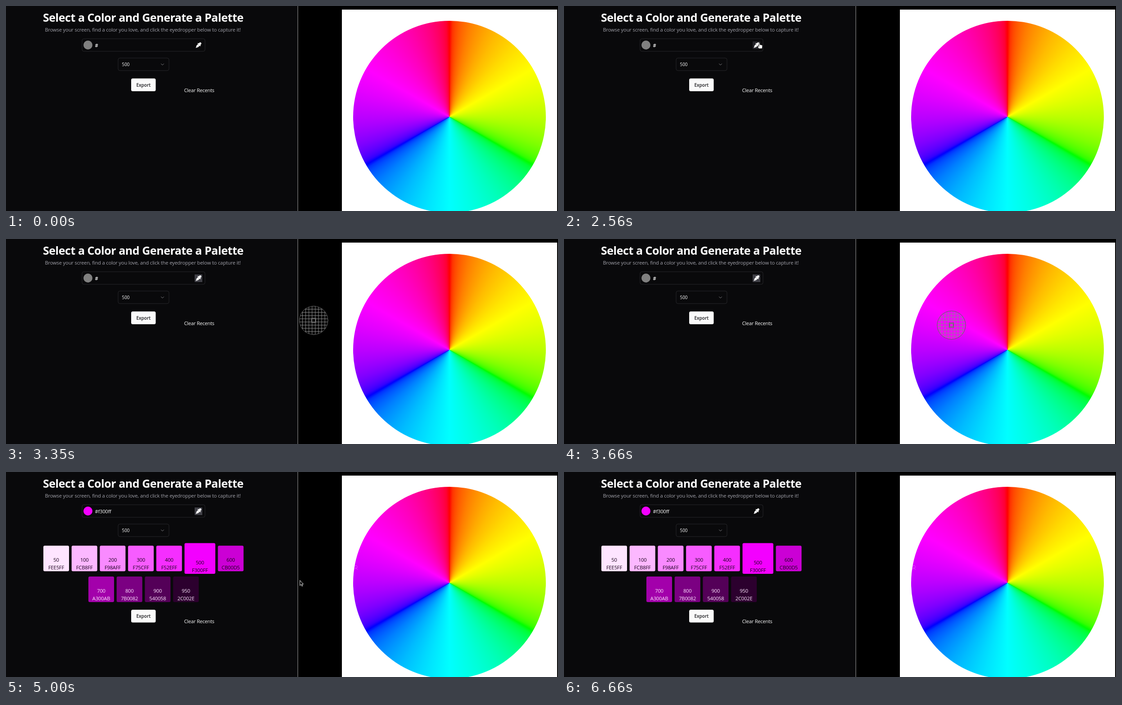
An HTML page for the animation above (7290 ms loop, 1226 px wide and 457 px high).

```html
<!DOCTYPE html>
<html lang="en">
<head>
<meta charset="utf-8">
<title>Palette generator</title>
<style>
  html, body { margin: 0; width: 100%; height: 100%; overflow: hidden; background: #000; }
  #image { position: absolute; left: 746px; top: 8px; width: 478px; height: 449px; overflow: hidden; background: #fff; }
  #wheel { position: absolute; left: 25px; top: 25px; width: 428px; height: 428px; border-radius: 50%; }
  svg { position: absolute; left: 0; top: 0; width: 1226px; height: 457px; }
  text { font-family: "Open Sans", "Noto Sans", sans-serif; font-size: 11.2px; fill: #fafafa; }
  .box { fill: #09090b; stroke: #27272a; }
  .mid { text-anchor: middle; }
</style>
</head>
<body>
<div id="image"><div id="wheel"></div></div>
<svg viewBox="0 0 1226 457">
  <rect width="648" height="457" fill="#09090b"/>
  <rect x="647.5" width="1.2" height="457" fill="#8a8a8a"/>

  <text x="82" y="35" font-weight="700" style="font-size:25px;letter-spacing:-.46px;fill:#fff">Select a Color and Generate a Palette</text>
  <text x="86.5" y="57" style="letter-spacing:-.176px;fill:#a1a1aa">Browse your screen, find a color you love, and click the eyedropper below to capture it!</text>

  <rect class="box" x="169" y="73" width="273" height="28" rx="4"/>
  <circle id="dot" cx="182" cy="87" r="10"/>
  <text id="hex" x="197.5" y="91.5" style="letter-spacing:-.25px"></text>
  <rect id="hover" x="419" y="79" width="17" height="17" fill="#3f3f46"/>
  <g transform="translate(427.5 87.5) rotate(45)" fill="#fff">
    <rect x="-2.5" y="-8" width="5" height="6.5" rx="2.4"/>
    <rect x="-4.2" y="-3.2" width="8.4" height="2.3" rx="1"/>
    <path d="M-2.5-.6h5V4L.9 6 .6 8H-.6L-.9 6-2.5 4Z"/>
  </g>

  <rect class="box" x="249" y="116" width="113" height="28" rx="4"/>
  <text x="257.5" y="133.5" font-weight="500" style="font-size:9.9px">500</text>
  <path d="M344.3 128.6l3.2 3.2 3.2-3.2" fill="none" stroke="#8b8b90"/>

  <g id="swatches"></g>
  <g id="actions">
    <rect x="278" y="161.5" width="54.5" height="28.5" rx="3.5" fill="#fafafa"/>
    <text class="mid" x="305.3" y="179.5" font-weight="600" style="font-size:10px;fill:#18181b">Export</text>
    <text x="395.5" y="191.5" style="letter-spacing:-.28px">Clear Recents</text>
  </g>

  <g id="smudge" fill="none" stroke="#ff8cff" stroke-opacity=".5">
    <path d="M774 209.5q4-3 6 1t-5 4l-2 3M777 214l4 4"/>
  </g>

  <g id="arrow">
    <path d="M.5.7V12.2L3.2 9.7 5 13.8 6.7 13 5 9.1H8.3Z" fill="#000" stroke="#fff" stroke-width=".9"/>
  </g>
  <g id="beam" fill="none">
    <path d="M-3-7H-.8L0-6.3.8-7H3M0-6.3V6.3M-3 7H-.8L0 6.3.8 7H3" stroke="#fff" stroke-width="2.6"/>
    <path d="M-2.6-7H-.8L0-6.3.8-7H2.6M0-6.3V6.3M-2.6 7H-.8L0 6.3.8 7H2.6" stroke="#000" stroke-width=".8"/>
  </g>
  <g id="hand">
    <path d="M-1 1Q0-.4 1 1V5L6 6.2Q7 6.6 6.8 8L6 14H-1.4L-4 9.5Q-4 7.6-2.4 8.4L-1 9.4Z" fill="#fff" stroke="#000" stroke-width=".8"/>
  </g>
  <g id="zoom" fill="none">
    <path d="M2.6 2.6L6.3 6.3" stroke="#fff" stroke-width="3.4"/>
    <path d="M2.6 2.6L6.3 6.3" stroke="#000" stroke-width="2"/>
    <circle r="4.4" fill="#fff"/>
    <circle r="3.6" stroke="#000" stroke-width="1.1"/>
    <path d="M-2 0H2M0-2V2" stroke="#000"/>
  </g>
  <g id="loupe">
    <clipPath id="lens"><circle r="32"/></clipPath>
    <circle id="glass" r="32"/>
    <path id="grid" clip-path="url(#lens)" fill="none" stroke="#8c8c8c" stroke-width="1"/>
    <circle r="31.6" fill="none" stroke="#606060"/>
    <rect x="-4.5" y="-4.5" width="9" height="9" fill="none" stroke="#333" stroke-width="2"/>
    <rect x="-4.5" y="-4.5" width="9" height="9" fill="none" stroke="#a0a0a0"/>
  </g>
</svg>
<script>
const LOOP = 7290;
const PICKED = 4280;
const $ = id => document.getElementById(id);
const show = (id, on) => { $(id).style.display = on ? '' : 'none'; };

// Hue wheel blended in linear light, clockwise from the top.
const toSrgb = v => Math.round(255 * (v <= .0031308 ? 12.92 * v : 1.055 * v ** (1 / 2.4) - .055));
const channel = (deg, peak) => {
  const d = Math.abs((deg - peak + 540) % 360 - 180);
  return toSrgb(Math.min(1, Math.max(0, 2 - d / 60)));
};
const wheelColor = deg => `rgb(${[0, 120, 240].map(p => channel(deg, p))})`;
const stops = Array.from({ length: 181 }, (_, i) => `${wheelColor(i * 2)} ${i * 2}deg`);
$('wheel').style.background = `conic-gradient(${stops})`;

function colorAt(x, y) {
  const dx = x - 985, dy = y - 247;
  if (Math.hypot(dx, dy) < 214) return wheelColor((Math.atan2(dx, -dy) * 180 / Math.PI + 360) % 360);
  return x < 648 ? '#09090b' : x < 746 ? '#000' : '#fff';
}

const PALETTE = [
  [50, 'FEE5FF'], [100, 'FCB8FF'], [200, 'F98AFF'], [300, 'F75CFF'], [400, 'F52EFF'], [500, 'F300FF'],
  [600, 'CB00D5'], [700, 'A300AB'], [800, '7B0082'], [900, '540058'], [950, '2C002E']
];
let left = 83;
$('swatches').innerHTML = PALETTE.map(([shade, hex], i) => {
  if (i === 7) left = 183;
  const size = shade === 500 ? 68.4 : 57;
  const middle = i < 7 ? 192.7 : 261.5;
  const x = left, center = x + size / 2, base = middle + size / 2;
  const look = `class="mid" x="${center}" font-weight="${i < 7 ? 400 : 500}" `
    + `style="letter-spacing:-.2px;fill:${i < 7 ? '#1c001e' : '#fee5ff'}"`;
  left += size + 5.7;
  return `<rect x="${x}" y="${middle - size / 2}" width="${size}" height="${size}" rx="3" fill="#${hex}"/>`
    + `<text ${look} y="${base - 21.2}">${shade}</text><text ${look} y="${base - 4.2}">${hex}</text>`;
}).join('');

let grid = '';
for (let i = -4.5; i < 5; i++) grid += `M${i * 7.1}-32v64M-32 ${i * 7.1}h64`;
$('grid').setAttribute('d', grid);

// Pointer moves: shape, start, end, number of poses, from, to, easing, bend.
const linear = p => p;
const easeOut = p => 1 - (1 - p) ** 2;
const easeInOut = p => p * p * (3 - 2 * p);
const MOVES = [
  ['arrow', 210, 680, 7, [299, 437], [267, 374], easeOut],
  ['arrow', 840, 1220, 6, [262, 358], [182, 124], easeInOut],
  ['beam', 1300, 1540, 4, [174, 100], [179, 94], linear],
  ['beam', 1930, 2170, 4, [235, 91], [436, 85], easeOut],
  ['hand', 2560, 2640, 2, [434, 81], [433, 80], linear],
  ['loupe', 2800, 2960, 3, [427, 89], [430, 101], linear],
  ['loupe', 3040, 3500, 7, [436, 116], [814, 189], easeInOut, [540, 182]],
  ['loupe', 3580, 3660, 2, [846, 191], [860.5, 192], linear],
  ['zoom', 4200, 4200, 1, [860.5, 192], [860.5, 192], linear],
  ['zoom', 4600, 4760, 3, [854, 194], [777, 212], linear],
  ['arrow', 4840, 5320, 7, [735, 222], [586, 256], easeOut],
  ['arrow', 5400, 6030, 9, [573.5, 256], [498, 256], easeOut],
  ['arrow', 6340, 6580, 4, [506, 285], [641, 444], linear],
  ['none', 6660, 6660, 1, [0, 0], [0, 0], linear]
];
const SHAPES = ['arrow', 'beam', 'hand', 'zoom', 'loupe'];

function pointerAt(t) {
  const move = MOVES.findLast(m => m[1] <= t);
  if (!move) return { shape: 'none', x: 0, y: 0 };
  const [shape, start, end, poses, from, to, ease, bend] = move;
  const last = poses - 1;
  const pose = last ? Math.min(last, Math.floor((t - start) / (end - start) * last + .05)) : 0;
  const p = last ? ease(pose / last) : 0;
  const mid = bend || from.map((v, i) => (v + to[i]) / 2);
  const [x, y] = from.map((v, i) => (1 - p) ** 2 * v + 2 * p * (1 - p) * mid[i] + p * p * to[i]);
  return { shape, x, y };
}

function draw(t) {
  const { shape, x, y } = pointerAt(t);
  for (const id of SHAPES) show(id, id === shape);
  if (shape !== 'none') $(shape).setAttribute('transform', `translate(${x} ${y})`);
  if (shape === 'loupe') $('glass').setAttribute('fill', colorAt(x, y));

  const picked = t >= PICKED;
  $('dot').setAttribute('fill', picked ? '#f300ff' : '#808080');
  $('hex').textContent = picked ? '#f300ff' : '#';
  $('hex').setAttribute('font-weight', picked ? 400 : 600);
  show('swatches', picked);
  $('actions').setAttribute('transform', `translate(0 ${picked ? 145.6 : 0})`);
  show('hover', t >= 2560 && t < 5080);
  $('hover').setAttribute('opacity', t < 2640 ? .5 : 1);
  show('smudge', t >= 4840);
}

const begin = performance.now();
function tick() {
  draw((performance.now() - begin) % LOOP);
  requestAnimationFrame(tick);
}
tick();
</script>
</body>
</html>
```
